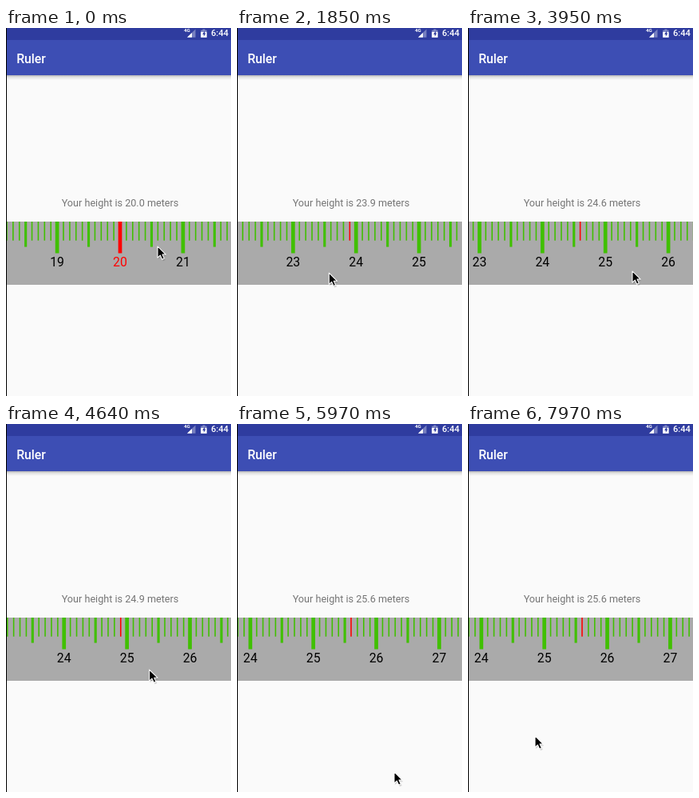
These frames come from a looping animation (282x460 px, 8 s). An HTML page:

```html
<!DOCTYPE html>
<html lang="en">
<head>
<meta charset="utf-8">
<title>Ruler</title>
<style>
  html, body { margin: 0; width: 100%; height: 100%; overflow: hidden; background: #fafafa; }
  svg { display: block; width: 282px; height: 460px; font-family: Roboto, "Noto Sans", sans-serif; }
  .tick { fill: #40c000; }
  .label { fill: #000; font-size: 15.8px; text-anchor: middle; }
  .on { fill: #f00; }
</style>
</head>
<body>
<svg viewBox="0 0 282 460">
  <defs>
    <linearGradient id="shade" x2="0" y2="1">
      <stop offset="0" stop-color="#000" stop-opacity=".28"/>
      <stop offset=".4" stop-color="#000" stop-opacity=".1"/>
      <stop offset="1" stop-color="#000" stop-opacity="0"/>
    </linearGradient>
  </defs>
  <rect width="282" height="460" fill="#fafafa"/>
  <rect y="59" width="282" height="6" fill="url(#shade)"/>
  <rect y="14" width="282" height="45" fill="#3d4eb4"/>
  <rect width="282" height="15" fill="#2f3c9f"/>
  <g fill="#fff">
    <text x="223" y="5" font-size="6.2" font-weight="700">4G</text>
    <path d="M237.5 1.5V11.8H227Z" opacity=".35"/>
    <path d="M233 6V11.8H227Z"/>
    <path d="M246.4 1.5h3v1.2h2.2v9.1h-7.4V2.7h2.2z" opacity=".4"/>
    <path d="M244.2 5h7.4v6.8h-7.4z"/>
    <path d="M249.2 3.2l-3 4.7h1.6v2.8l2.6-4.2h-1.4z" fill="#2f3c9f"/>
    <text x="257" y="10.3" font-size="11.1" font-weight="500">6:44</text>
    <text x="13.2" y="43.8" font-size="15.8" font-weight="500">Ruler</text>
  </g>
  <text id="height" x="143" y="223" font-size="12.63" text-anchor="middle" fill="#757575"></text>
  <rect y="242" width="282" height="79" fill="#aaa"/>
  <g id="scale"></g>
  <rect width="1" height="460" fill="#000"/>
  <g id="cursor">
    <g transform="scale(.87)">
      <path d="M1 2V18.5L5 15l3 6 3.2-1.4-2.7-5.6H13Z" fill="#000" opacity=".15"/>
      <path d="M0 0V16.2L3.8 12.7 6.5 18.6 9.5 17.3 6.9 11.6H11.8Z"
            fill="#000" stroke="#fff" stroke-width="1.2" stroke-linejoin="round"/>
    </g>
  </g>
</svg>
<script>
  const LOOP = 8000, WIDTH = 282, CENTER = 143, STEP = 7.89, FIRST = 17, LAST = 29;
  const $ = id => document.getElementById(id);

  // Pointer strokes: start, end, x, y, and the ruler value reached when dragging.
  const rest = { x: 190, y: 273, value: 20 };
  const strokes = [
    [60, 910, 16, 284, 22.18],
    [910, 1420, 250, 298],
    [1420, 2010, 86, 308, 24.3],
    [2010, 2530, 235, 299],
    [2650, 2830, 231, 299, 24.355],
    [2830, 3480, 218, 302, 24.5],
    [3710, 3950, 206, 304, 24.63],
    [3950, 5150, 163, 309, 25.055],
    [5150, 5520, 122, 312, 25.6],
    [5520, 5970, 197, 435],
    [5970, 6200, 150, 464],
    [6200, 6370, 190, 464],
    [6370, 6640, 38, 94],
    [6640, 6910, 127, 171],
    [7270, 7970, 84, 390]
  ];

  const ease = u => u * u * (3 - 2 * u);
  const mix = (a, b, u) => a + (b - a) * u;

  function stateAt(t) {
    let { x, y, value } = rest;
    for (const [start, end, toX, toY, toValue = value] of strokes) {
      if (t < start) break;
      const u = ease(Math.min(1, (t - start) / (end - start)));
      x = mix(x, toX, u);
      y = mix(y, toY, u);
      value = mix(value, toValue, u);
    }
    return { x, y, value };
  }

  function add(tag, attrs, text = "") {
    const el = document.createElementNS("http://www.w3.org/2000/svg", tag);
    for (const name in attrs) el.setAttribute(name, attrs[name]);
    el.textContent = text;
    $("scale").append(el);
    return el;
  }

  const marks = [];
  for (let n = FIRST * 10; n <= LAST * 10; n++) {
    const x = (n - FIRST * 10) * STEP;
    const [width, height] = n % 10 === 0 ? [4.7, 39.5] : n % 5 === 0 ? [3.15, 31.6] : [1.58, 23.7];
    const tick = add("rect", { class: "tick", x: x - width / 2, y: 242, width, height });
    const label = n % 10 === 0 && add("text", { class: "label", x, y: 297.6 }, n / 10);
    marks.push({ n, x, tick, label });
  }

  function draw(t) {
    const { x, y, value } = stateAt(t);
    const nearest = Math.round(value * 10);
    const shift = CENTER - (value - FIRST) * 10 * STEP;
    for (const mark of marks) {
      const on = mark.n === nearest;
      mark.tick.classList.toggle("on", on);
      if (!mark.label) continue;
      const left = mark.x + shift;
      mark.label.classList.toggle("on", on);
      mark.label.style.display = left > 0 && left < WIDTH ? "" : "none";
    }
    $("height").textContent = `Your height is ${(nearest / 10).toFixed(1)} meters`;
    $("scale").setAttribute("transform", `translate(${shift} 0)`);
    $("cursor").setAttribute("transform", `translate(${x} ${y})`);
  }

  const start = performance.now();
  function loop() {
    draw((performance.now() - start) % LOOP);
    requestAnimationFrame(loop);
  }
  loop();
</script>
</body>
</html>
```
